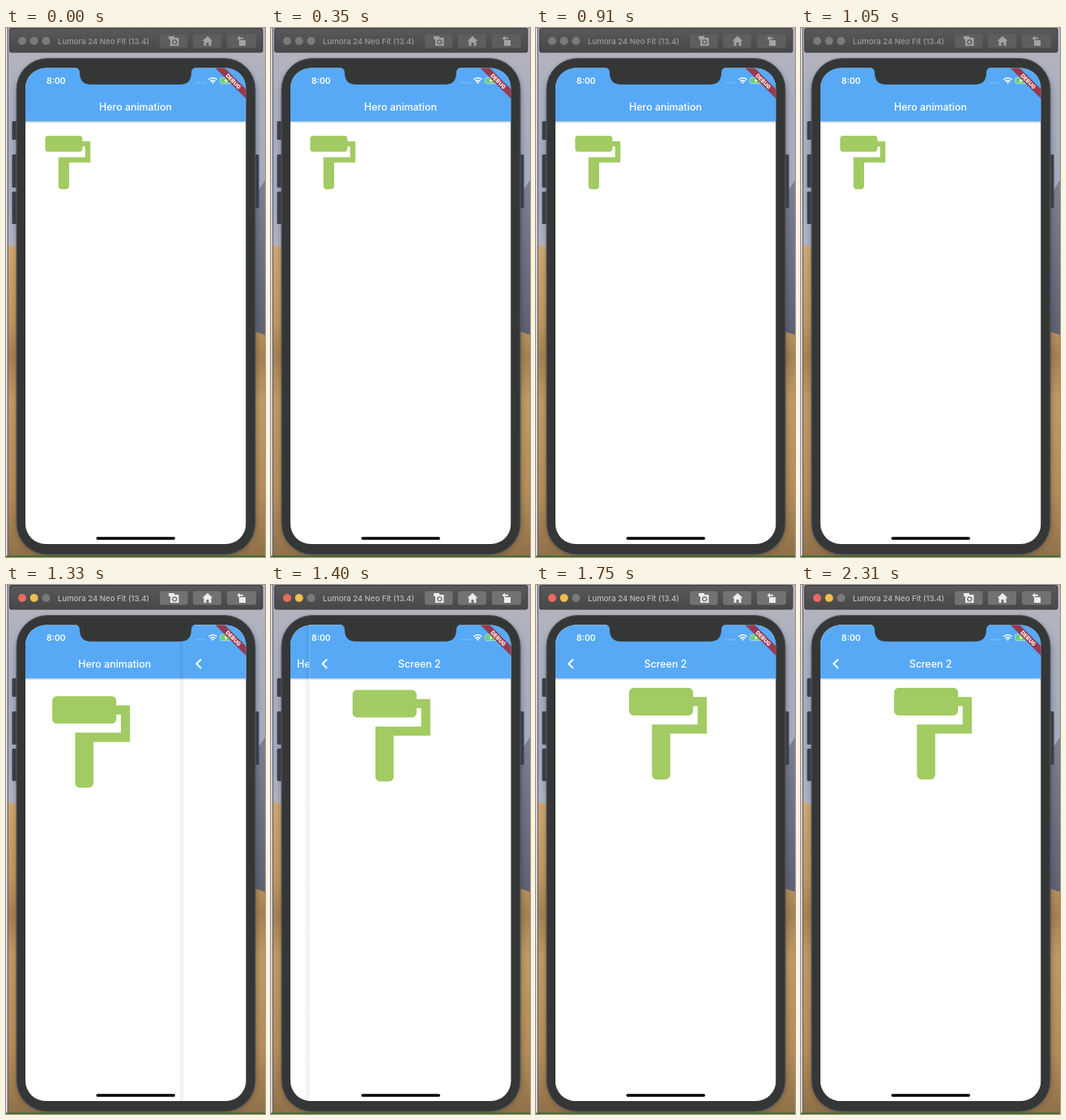
These frames come from a looping animation (320 by 653 pixels, 2380 ms). An HTML page:

```html
<!DOCTYPE html>
<html lang="en">
<head>
<meta charset="utf-8">
<title>Hero animation</title>
<style>
  html, body { margin: 0; width: 100%; height: 100%; overflow: hidden; background: #fff; }
  svg { display: block; width: 100%; height: 100%; }
  text { font-family: Inter, Roboto, sans-serif; }
  .title { font-size: 12.4px; font-weight: 500; fill: #fff; text-anchor: middle; }
  .name { font-size: 9.6px; font-weight: 500; fill: #9b9a9b; }
  .btn { fill: #5f5e5f; }
  .glyph { fill: #a3a2a3; }
  .light { fill: #7b7a7b; }
  .active .name { fill: #bdbcbd; }
  .active .btn { fill: #737273; }
  .active .glyph { fill: #ececec; }
  .active .close { fill: #ed6a5e; }
  .active .mini { fill: #f2bd4c; }
</style>
</head>
<body>
<svg viewBox="0 0 320 653" preserveAspectRatio="none">
  <defs>
    <linearGradient id="sky" x2="0" y2="1">
      <stop offset="0" stop-color="#b9b7be"/>
      <stop offset=".3" stop-color="#a9aebf"/>
      <stop offset=".75" stop-color="#a3aabd"/>
      <stop offset="1" stop-color="#b4b7c6"/>
    </linearGradient>
    <linearGradient id="sand" x2="0" y2="1">
      <stop offset="0" stop-color="#cda771"/>
      <stop offset=".25" stop-color="#bd9660"/>
      <stop offset=".36" stop-color="#a68150"/>
      <stop offset=".5" stop-color="#c09964"/>
      <stop offset=".8" stop-color="#b58c58"/>
      <stop offset="1" stop-color="#8f7049"/>
    </linearGradient>
    <linearGradient id="rock" x2="0" y2="1">
      <stop offset="0" stop-color="#7d8092"/>
      <stop offset="1" stop-color="#5f6274"/>
    </linearGradient>
    <linearGradient id="bar" x2="0" y2="1">
      <stop offset="0" stop-color="#5a595a"/>
      <stop offset="1" stop-color="#484748"/>
    </linearGradient>
    <linearGradient id="edge">
      <stop offset="0" stop-color="#000" stop-opacity=".02"/>
      <stop offset="1" stop-color="#000" stop-opacity=".07"/>
    </linearGradient>
    <linearGradient id="drop" x2="0" y2="1">
      <stop offset="0" stop-color="#000" stop-opacity=".2"/>
      <stop offset="1" stop-color="#000" stop-opacity="0"/>
    </linearGradient>
    <filter id="soft" x="-10%" y="-5%" width="120%" height="110%"><feGaussianBlur stdDeviation="3"/></filter>
    <clipPath id="screen"><rect x="24" y="49.5" width="272.5" height="587.5" rx="25"/></clipPath>
    <path id="roller" d="M18 4V3c0-.55-.45-1-1-1H5c-.55 0-1 .45-1 1v4c0 .55.45 1 1 1h12c.55 0 1-.45 1-1V6h1v4H9v11c0 .55.45 1 1 1h2c.55 0 1-.45 1-1v-9h8V4h-3z"/>
    <g id="page">
      <rect x="24" y="49" width="272.5" height="589" fill="#fff"/>
      <rect x="24" y="115" width="272.5" height="3" fill="url(#drop)"/>
      <rect x="24" y="49" width="272.5" height="66.3" fill="#57a9f6"/>
    </g>
  </defs>

  <!-- desktop -->
  <rect x="2" width="318" height="653" fill="url(#sand)"/>
  <path d="M2 0H320V290H2Z" fill="url(#sky)"/>
  <path d="M300 222L312 200 320 188V379L300 373Z" fill="url(#rock)"/>
  <path d="M2 267L16 272V653H2ZM300 372L320 379V653H300Z" fill="url(#sand)"/>
  <rect x="13" y="40" width="296" height="611" rx="40" fill="#20222c" opacity=".4" filter="url(#soft)"/>
  <rect width="2" height="653" fill="#e6e6ea"/>
  <rect x="1.6" width="1.2" height="653" fill="#575a68"/>

  <!-- window bar -->
  <g id="win">
    <rect x="4" y="0" width="313.5" height="30.5" rx="3" fill="#343a50"/>
    <rect x="5" y="1" width="311.5" height="29" rx="3" fill="url(#bar)"/>
    <circle class="light close" cx="20" cy="16" r="5"/>
    <circle class="light mini" cx="34.7" cy="16" r="5"/>
    <circle class="light" cx="49.5" cy="16" r="5"/>
    <text class="name" x="64" y="19.6">Lumora 24 Neo Fit (13.4)</text>
    <rect class="btn" x="190" y="7.5" width="34.5" height="17" rx="3"/>
    <rect class="btn" x="231" y="7.5" width="35" height="17" rx="3"/>
    <rect class="btn" x="273" y="7.5" width="36" height="17" rx="3"/>
    <g class="glyph">
      <path fill-rule="evenodd" d="M201 10h7v2h5.500v10h-10.500v-8h-2ZM208.300 14a3.300 3.300 0 1 0 .01 0ZM208.300 15.500a1.800 1.800 0 1 1-.01 0Z"/>
      <path d="M249 10l6.500 6h-2v6h-3v-4h-3v4h-3v-6h-2Z"/>
      <path d="M288 15h8v7h-8ZM285.500 12.800l3.500-3v2h4v2h-4v2Z"/>
    </g>
  </g>

  <!-- phone -->
  <g fill="#3b3e49">
    <rect x="7.500" y="115" width="8" height="23" rx="1.500"/>
    <rect x="7.500" y="156" width="8" height="41" rx="1.500"/>
    <rect x="7.500" y="202" width="8" height="40" rx="1.500"/>
    <rect x="304" y="156" width="8.500" height="66" rx="1.500"/>
  </g>
  <rect x="13" y="37.500" width="295" height="612.500" rx="38" fill="#353737" stroke="#55585f"/>

  <g clip-path="url(#screen)">
    <g id="first">
      <use href="#page"/>
      <text class="title" x="160" y="101.500">Hero animation</text>
      <use id="small" href="#roller" fill="#a2cb63" transform="translate(35.200 126.500) scale(3.290)"/>
    </g>
    <g id="second">
      <rect x="18.500" y="49" width="5.500" height="589" fill="url(#edge)"/>
      <use href="#page"/>
      <path d="M46 91.800L40.300 97.300 46 102.800" fill="none" stroke="#fff" stroke-width="2"/>
      <text class="title" x="160" y="101.500">Screen 2</text>
    </g>
    <use id="hero" href="#roller" fill="#a2cb63"/>

    <!-- status bar -->
    <text x="50" y="68.800" font-size="10.400" font-weight="600" fill="#fff">8:00</text>
    <path d="M234.500 67.500H246" stroke="#fff" stroke-opacity=".4" stroke-width="1.300" stroke-dasharray="1.500 1.700"/>
    <g fill="none" stroke="#fff" stroke-width="1.500">
      <path d="M250.300 63.800Q255.500 59.200 260.700 63.800M252.300 66Q255.500 63.200 258.700 66"/>
      <path d="M254 67L255.500 68.500 257 67Z" fill="#fff" stroke-width=".6"/>
    </g>
    <rect x="264.500" y="61.300" width="14" height="7.400" rx="2" fill="#6fce73" stroke="#b9dcf8" stroke-width=".8"/>
    <path d="M272.500 61.800L269.500 65.500H271.800L270.500 68.500 274 64.500H271.700Z" fill="#fff"/>

    <g transform="translate(296.700 50) rotate(45)">
      <rect x="-32" y="17.800" width="64" height="9" fill="#000" opacity=".14"/>
      <rect x="-32" y="18.400" width="64" height="7.900" fill="#b1212a" fill-opacity=".78"/>
      <text y="24.800" font-size="6.700" font-weight="800" fill="#fff" text-anchor="middle">DEBUG</text>
    </g>
    <rect x="111.500" y="628.300" width="97.500" height="3.400" rx="1.700"/>
  </g>
  <path d="M85 48.500Q91 49.500 91 55Q91 69.800 105 69.800H215Q229 69.800 229 55Q229 49.500 235 48.500Z" fill="#353737"/>
  <rect y="651.500" width="320" height="1.500" fill="#2d6b2f"/>
</svg>
<script>
const LOOP = 2380, TICK = 70, FOCUS = 1260, PUSH = 1310, SPAN = 184, WIDTH = 272.5;
const el = id => document.getElementById(id);
const [win, first, second, small, hero] = ['win', 'first', 'second', 'small', 'hero'].map(el);
const mix = (a, b, k) => a + (b - a) * k;

// Cubic bezier easing, solved by bisection
function bezier(x1, y1, x2, y2) {
  const at = (a, b, s) => 3 * a * s * (1 - s) ** 2 + 3 * b * s * s * (1 - s) + s ** 3;
  return x => {
    if (x <= 0 || x >= 1) return x <= 0 ? 0 : 1;
    let lo = 0, hi = 1;
    for (let i = 0; i < 24; i++) {
      const mid = (lo + hi) / 2;
      if (at(x1, x2, mid) < x) lo = mid; else hi = mid;
    }
    return at(y1, y2, lo);
  };
}
const slide = bezier(.35, .91, .33, .97);
const fly = bezier(.4, 0, .2, 1);

const show = (node, on) => node.setAttribute('visibility', on ? 'visible' : 'hidden');
const move = (node, x) => node.setAttribute('transform', `translate(${x} 0)`);

function draw(t) {
  const k = (t - PUSH) / SPAN, p = slide(k), h = fly(k), pushed = k > 0;
  win.classList.toggle('active', t >= FOCUS);
  move(first, -p * WIDTH / 3);
  move(second, (1 - p) * WIDTH);
  show(second, pushed);
  show(small, !pushed);
  show(hero, pushed);
  hero.setAttribute('transform', `translate(${mix(32.7, 92.4, h)} ${mix(126.2, 115.7, h)}) scale(5.65)`);
}

function frame() {
  const t = performance.now() % LOOP;
  draw(Math.floor(t / TICK) * TICK);
  requestAnimationFrame(frame);
}
frame();
</script>
</body>
</html>
```
